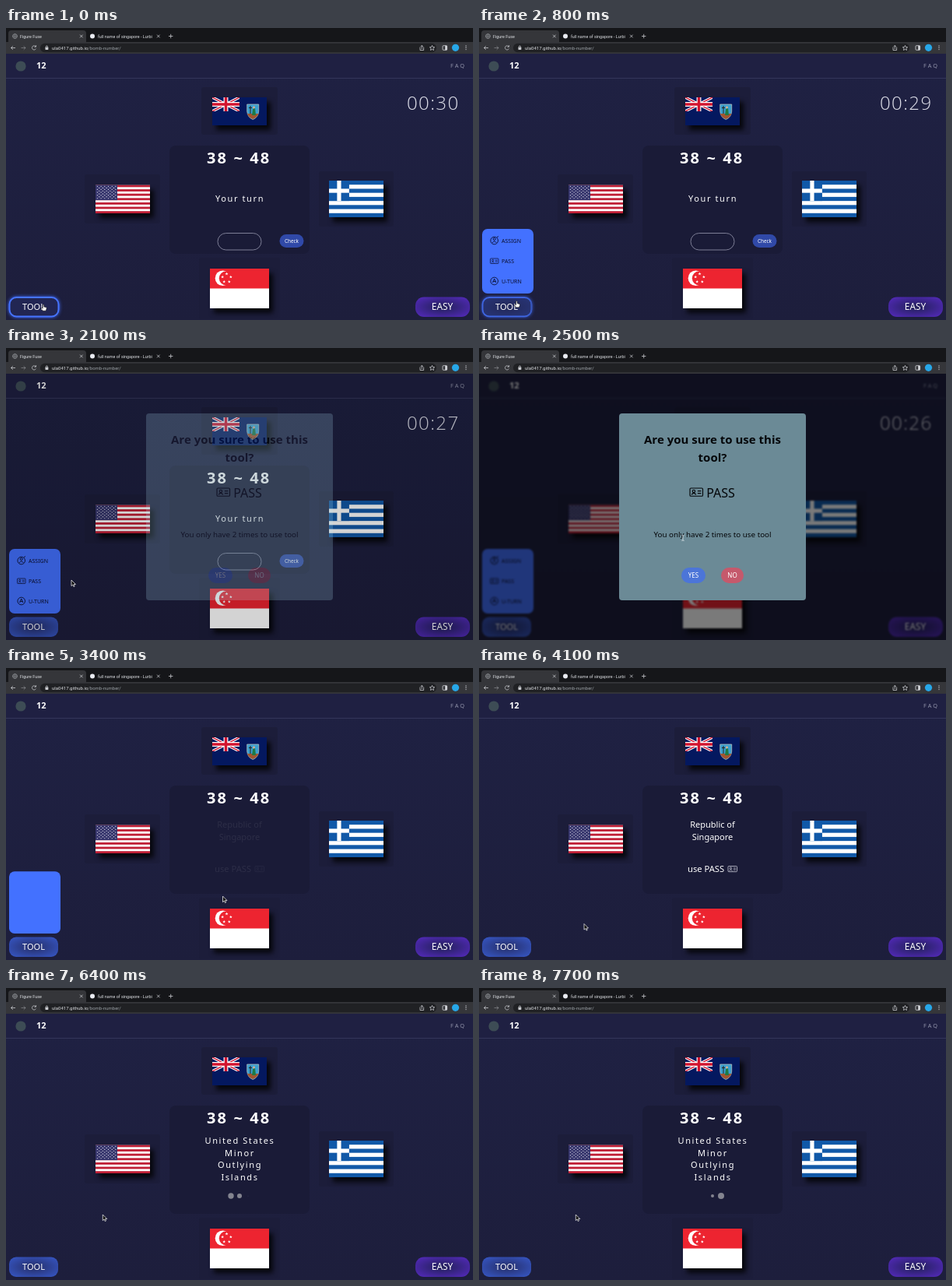
Recreate the animation shown at these times as an HTML page. Size 600x375 px, loop 7.8 s.

```html
<!DOCTYPE html>
<html lang="en">
<head>
<meta charset="utf-8">
<title>Figure Fuse</title>
<style>
  html, body { margin: 0; width: 100%; height: 100%; overflow: hidden; background: #1e1f3f; }
  svg { display: block; width: 600px; height: 375px; }
  text { font-family: "Noto Sans", "Open Sans", sans-serif; fill: #fff; white-space: pre; }
  .ui text { font-family: Roboto, Inter, sans-serif; fill: #dfe1e5; }
  .mid { text-anchor: middle; }
  .flag { filter: drop-shadow(5px 6px 3px #000c); }
  .line { fill: none; stroke: #c8cacf; stroke-width: .8; }
</style>
</head>
<body>
<svg id="stage" viewBox="0 0 600 375"></svg>
<script>
const LOOP = 7800, STEP = 100;

const text = (x, y, size, str, more = '') => `<text x="${x}" y="${y}" font-size="${size}" ${more}>${str}</text>`;
const mid = (x, y, size, str, more = '') => text(x, y, size, str, `class="mid" ${more}`);
const rect = (x, y, w, h, fill, r = 0, more = '') =>
  `<rect x="${x}" y="${y}" width="${w}" height="${h}" rx="${r}" fill="${fill}" ${more}/>`;
const disc = (x, y, r, fill, more = '') => `<circle cx="${x}" cy="${y}" r="${r}" fill="${fill}" ${more}/>`;
const path = (d, more = 'class="line"') => `<path d="${d}" ${more}/>`;
const group = (id, body, more = '') => `<g id="${id}" ${more}>${body}</g>`;
const range = (n, fn) => Array.from({ length: n }, (_, i) => fn(i)).join('');
const frame = (x, y, w, h, vw, vh, body) =>
  `<svg x="${x}" y="${y}" width="${w}" height="${h}" viewBox="0 0 ${vw} ${vh}" preserveAspectRatio="none">${body}</svg>`;

function star(cx, cy, r, fill) {
  const pts = Array.from({ length: 10 }, (_, i) => {
    const a = i * Math.PI / 5, q = i % 2 ? r * .4 : r;
    return `${(cx + q * Math.sin(a)).toFixed(2)},${(cy - q * Math.cos(a)).toFixed(2)}`;
  });
  return `<polygon points="${pts.join(' ')}" fill="${fill}"/>`;
}

const stripes = (n, w, h, color) => range(n, i => i % 2 ? '' : rect(0, i * h / n, w, h / n, color));

function usFlag() {
  const stars = range(9, r => range(r % 2 ? 5 : 6, c => star(2.4 + c * 4.7 + (r % 2) * 2.35, 2 + r * 1.9, .95, '#fff')));
  return frame(115, 201.5, 70, 36.5, 70, 36.5,
    rect(0, 0, 70, 36.5, '#fff') + stripes(13, 70, 36.5, '#c01f36') + rect(0, 0, 28, 19.6, '#35346c') + stars);
}

function unionJack() {
  const cross = 'M0 0L60 30M60 0L0 30', plus = 'M30 0V30M0 15H60';
  const stroke = (d, color, w) => path(d, `stroke="${color}" stroke-width="${w}" fill="none"`);
  return frame(265, 89, 35, 18, 60, 30, rect(0, 0, 60, 30, '#04185f') + stroke(cross, '#fff', 6) +
    stroke(cross, '#d2142f', 2.4) + stroke(plus, '#fff', 10) + stroke(plus, '#d2142f', 6));
}

function islandFlag() {
  const shield = 'M309.7 98H324.7V107Q324 115 317.2 117.5Q310.4 115 309.7 107Z';
  return rect(265, 89, 70, 36, '#04185f') + unionJack() +
    path(shield, 'fill="#3b9fd0" stroke="#c9c7b8" stroke-width=".7"') +
    path('M310 110H324.3Q323 115 317.2 117Q311.5 115 310 110Z', 'fill="#a2552f"') +
    path('M314 100V110M312 102.5H316', 'stroke="#20231f" stroke-width="1" fill="none"') +
    path('M317 104L320 103L321 112H316Z', 'fill="#1f7a45"') + disc(318.5, 102, 1.4, '#e0b28c');
}

function greekFlag() {
  return frame(415, 196, 70, 47, 27, 18, rect(0, 0, 27, 18, '#fff') + stripes(9, 27, 18, '#1159a8') +
    rect(0, 0, 10, 10, '#1159a8') + rect(4, 0, 2, 10, '#fff') + rect(0, 4, 10, 2, '#fff'));
}

function lionFlag() {
  const ring = range(5, i => {
    const a = i * Math.PI * .4;
    return star(283.5 + 5.6 * Math.sin(a), 321.3 - 5.6 * Math.cos(a), 2.1, '#fff');
  });
  return rect(262, 309, 76, 51, '#fff') + rect(262, 309, 76, 25.5, '#ed2430') +
    disc(278.5, 321.3, 9.8, '#fff') + disc(282.8, 321.3, 9, '#ed2430') + ring;
}

function card(x, y, w, color) {
  const h = w * .62;
  return `<g fill="none" stroke="${color}" stroke-width="${w * .07}">` +
    rect(x, y, w, h, 'none', w * .08) + disc(x + w * .3, y + h * .38, w * .1, 'none') +
    path(`M${x + w * .13} ${y + h * .82}q${w * .17} ${-h * .4} ${w * .34} 0M${x + w * .6} ${y + h * .35}h${w * .27}M${x + w * .6} ${y + h * .65}h${w * .27}`, '') + '</g>';
}

const defs = `<defs>
  <radialGradient id="blue" r=".62"><stop offset=".1" stop-color="#27316f"/><stop offset="1" stop-color="#3553bd"/></radialGradient>
  <radialGradient id="violet" r=".62"><stop offset=".1" stop-color="#25215f"/><stop offset="1" stop-color="#5029b4"/></radialGradient>
  <linearGradient id="sky" x2="0" y2="1"><stop offset="0" stop-color="#1f2143"/><stop offset="1" stop-color="#1d1e3c"/></linearGradient>
</defs>`;

const browser = group('browser',
  rect(0, 0, 600, 19, '#151619') + rect(3, 3, 100, 20, '#35363a', 4) + rect(0, 18, 600, 15, '#35363a') +
  disc(11.5, 10.5, 2.8, 'none', 'stroke="#a5a8ad" stroke-width=".8"') + path('M8.7 10.5H14.3M11.5 7.7V13.3', 'stroke="#a5a8ad" stroke-width=".5"') +
  text(18, 12.5, 5.4, 'Figure Fuse') + path('M95 8.7l3.6 3.6m0-3.6l-3.6 3.6') +
  disc(111, 10.5, 3, '#e8eaf0') + text(118, 12.5, 5.4, 'full name of singapore - Lurbi') +
  path('M194 8.7l3.6 3.6m0-3.6l-3.6 3.6M209 10.5h5.4M211.7 7.8v5.4') +
  path('M12 25.5H6.5m2.3-2.3l-2.3 2.3l2.3 2.3') + path('M19.5 25.5H25m-2.3-2.3l2.3 2.3l-2.3 2.3', 'class="line" opacity=".5"') +
  path('M38.3 24a2.6 2.6 0 1 0 .1 2.6M38.5 22.2v2h-2') +
  rect(44, 19.8, 509, 11.4, '#202124', 5.7) +
  rect(50.5, 24.8, 3.8, 3.2, '#c8cacf', .5) + path('M51.3 25v-1a1.1 1.1 0 0 1 2.2 0v1') +
  text(59, 27.6, 6, 'ula0417.github.io<tspan fill="#9aa0a6">/bomb-number/</tspan>') +
  path('M532 24.5v4h4.6v-4M534.3 27v-4.6m-1.5 1.5l1.5-1.5l1.5 1.5') +
  path('M547.5 22.4l1 2.1 2.2.2-1.7 1.5.5 2.3-2-1.2-2 1.2.5-2.3-1.7-1.5 2.2-.2z') +
  rect(561, 22.7, 5.6, 5.6, 'none', 1, 'stroke="#d6d8dc" stroke-width=".8"') + rect(564.2, 22.7, 2.4, 5.6, '#d6d8dc') +
  disc(577.5, 25.3, 4.6, '#27a7e8') +
  range(3, i => disc(591, 23 + i * 2.3, .7, '#c8cacf')), 'class="ui"');

const panels = [[251, 76, 98, 61], [101, 188, 97, 63], [402, 184, 96, 71], [248, 295, 104, 79]]
  .map(b => rect(...b, '#1c1d3a', 3)).join('');

const bigLines = ['United States', 'Minor', 'Outlying', 'Islands'];
const center = rect(210, 151, 180, 139, '#1a1b37', 8) +
  text(258, 174, 20, '38 ~ 48', 'font-weight="700" letter-spacing="2.1"') +
  group('ask', text(269, 223, 11, 'Your turn', 'letter-spacing="1.6"') +
    rect(272, 263.5, 56, 21.5, 'none', 10.7, 'stroke="#7d7e96"') +
    rect(351.5, 265, 31, 17, '#3049a8', 8.5) + mid(367, 275.8, 6.4, 'Check')) +
  group('reply', mid(300, 205, 11, 'Republic of') + mid(300, 221, 11, 'Singapore') +
    text(268, 262, 11.2, 'use PASS') + card(320, 254.5, 11.5, '#c9cad6')) +
  group('next', bigLines.map((s, i) => mid(300.5, 200 + i * 15.5, 11, s, 'letter-spacing="1.6"')).join('') +
    range(3, i => disc(289 + i * 11, 267, 4, '#83848f', 'class="dot"')));

const ink = '#0c1030';
const ring = (y, d) => disc(19.7, y, 4.8, 'none', `stroke="${ink}" stroke-width=".9"`) + path(d, `fill="none" stroke="${ink}" stroke-width=".9"`);
const menu = group('menu', rect(4, 258, 66, 83, '#4371ff', 7) + group('items',
  ring(273, 'M17 276q2.7-4 5.4 0M18.2 271a1.5 1.5 0 1 0 3 0a1.5 1.5 0 1 0-3 0M23 269l2-1.6') + text(29, 275.6, 7, 'ASSIGN', `style="fill:${ink}"`) +
  group('plain', card(14.5, 296, 10.5, ink) + text(29, 301.6, 7, 'PASS', `style="fill:${ink}"`)) +
  group('lit', card(14.5, 296, 10.5, '#253a9a') + text(29, 301.6, 7, 'PASS', 'font-style="italic" font-weight="300" letter-spacing=".3"') +
    text(53, 302.3, 9, '×2', 'font-weight="700"')) +
  ring(325, 'M17.5 327l2.2-5l2.2 5M18.3 325.5h3') + text(29, 327.6, 7, 'U-TURN', `style="fill:${ink}"`)));

const useTips = group('tips',
  rect(72, 292, 24, 15, '#2c4199', 7.5, 'style="filter:drop-shadow(0 0 2px #3f64e8)"') + mid(84, 301.9, 6.8, 'use') +
  disc(109, 299.5, 6.3, '#2f4aaa') + mid(109, 302.2, 7, '?'));

const page = group('page',
  rect(0, 33, 600, 342, 'url(#sky)') + rect(0, 33, 600, 31, '#1f2042') + rect(0, 64, 600, 1, '#34365a') +
  disc(19, 49, 6.6, '#3d4c55') + text(39, 52, 11, '12', 'font-weight="700"') +
  text(571, 50.6, 7.4, 'FAQ', 'letter-spacing="2" style="fill:#8f91a8"') +
  text(515, 105, 24, '', 'id="clock" font-weight="300" letter-spacing="1.4" style="font-family:\'Open Sans\',sans-serif;fill:#dcdde8"') +
  panels + `<g class="flag">${islandFlag()}</g><g class="flag">${greekFlag()}</g><g class="flag">${lionFlag()}</g>` +
  group('us', usFlag()) +
  group('info', mid(150, 211.8, 4.5, 'United States Minor', 'style="fill:#15101c" font-weight="600"') +
    mid(150, 217.8, 4.5, 'Outlying islands', 'style="fill:#15101c" font-weight="600"') +
    rect(133.5, 232, 33, 13, 'none', 2, 'stroke="#70405a" stroke-width=".6" opacity=".6"') +
    mid(150.5, 241.5, 8.5, 'INFO', 'style="fill:#5a3146" letter-spacing="1"')) +
  center + menu + useTips +
  group('tool', rect(4, 345.5, 63, 25.5, 'url(#blue)', 9)) +
  group('toolLit', rect(4.5, 346, 63, 24.5, '#222653', 9, 'stroke="#4674ff" stroke-width="2" style="filter:drop-shadow(0 0 2px #3f6cff)"')) +
  mid(35.5, 362, 11, 'TOOL') +
  rect(526, 345.5, 70, 25.5, 'url(#violet)', 11) + mid(560.5, 362, 11.8, 'EASY'));

const modal = group('modal', rect(0, 33, 600, 342, '#000', 0, 'opacity=".52"') +
  rect(180, 84, 240, 240, '#6b8a96', 4) +
  `<g style="--k:#05070a">` +
  [[300, 122.5, 15, 'Are you sure to use this', 'font-weight="700"'], [300, 145.5, 15, 'tool?', 'font-weight="700"'],
   [310.5, 191.5, 16, 'PASS', ''], [300, 243, 9.8, 'You only have 2 times to use tool', '']]
    .map(([x, y, s, str, more]) => mid(x, y, s, str, more + ' style="fill:var(--k)"')).join('') + '</g>' +
  card(271, 180, 16.5, '#05070a') +
  rect(260, 282, 31, 20, '#4c75d8', 10) + mid(275.5, 294.8, 8, 'YES') +
  rect(311, 282, 29, 20, '#c5596c', 10) + mid(325.5, 294.8, 8, 'NO'));

const cursor = group('cursor',
  group('arrow', path('M0 0V7.6L1.8 6L3 8.6L4.2 8L3.1 5.5H5.5Z', 'fill="#111" stroke="#fff" stroke-width=".7"')) +
  group('hand', path('M-.8 .4Q0-.6 .8 .4V3L3.8 3.8Q4.6 4.4 4 6L3.2 8.2H-.8L-3 5Q-2.6 4-1.6 4.6L-.8 5.2Z', 'fill="#fff" stroke="#111" stroke-width=".6"')) +
  group('beam', path('M-1.6-3.5Q0-3.5 0-2.5V2.5Q0 3.5-1.6 3.5M1.6-3.5Q0-3.5 0-2.5M0 2.5Q0 3.5 1.6 3.5', 'fill="none" stroke="#dfe6ea" stroke-width=".8"')));

document.getElementById('stage').innerHTML = defs + page + modal + browser + cursor;

const $ = id => document.getElementById(id);
const dots = [...document.querySelectorAll('.dot')];
const ramp = (t, a, b) => Math.min(1, Math.max(0, (t - a) / (b - a)));
const ease = p => p * p * (3 - 2 * p);
const show = (id, v) => { $(id).style.opacity = +v; };

// time, x, y, pointer shape from that time on
const moves = [
  [0, 48, 355, 'hand'], [700, 48, 355, 'hand'], [1300, 52, 296, 'hand'], [1500, 52, 296, 'hand'],
  [1800, 84, 298, 'hand'], [2100, 84, 298, 'arrow'], [2400, 262, 244, 'beam'], [2600, 262, 244, 'arrow'],
  [2800, 275, 290, 'hand'], [3100, 275, 290, 'arrow'], [3400, 278.5, 293, 'arrow'], [3900, 135, 328.5, 'arrow'],
  [4500, 135, 328.5, 'arrow'], [5000, 123, 226, 'arrow'], [5900, 123, 226, 'arrow'], [6300, 124.3, 291, 'arrow']
];

function moveCursor(t) {
  const i = moves.findLastIndex(m => m[0] <= t);
  const a = moves[i], b = moves[i + 1] || a;
  const p = a === b ? 0 : ease(ramp(t, a[0], b[0]));
  $('cursor').setAttribute('transform', `translate(${a[1] + (b[1] - a[1]) * p} ${a[2] + (b[2] - a[2]) * p})`);
  for (const id of ['arrow', 'hand', 'beam']) show(id, id === a[3]);
}

function draw(t) {
  $('clock').textContent = t < 3100 ? '00:' + (30 - Math.floor((t + 100) / 620)) : '';

  const open = ease(ramp(t, 200, 600)), shut = ramp(t, 3300, 3800);
  const size = open * (1 - shut * shut);
  $('menu').setAttribute('transform', `translate(0 ${341 * (1 - size)}) scale(1 ${size})`);
  show('items', ramp(t, 300, 600) * (1 - ramp(t, 3200, 3400)));
  const pick = t >= 1200 && t < 2100;
  show('lit', pick);
  show('plain', !pick);
  show('tips', pick);
  show('toolLit', 1 - ramp(t, 700, 1000));

  const ask = ramp(t, 2000, 2300) * (1 - ramp(t, 3000, 3300));
  show('modal', ask);
  $('page').style.filter = ask ? `blur(${1.1 * ask}px)` : 'none';

  show('ask', t < 3100);
  show('reply', ease(ramp(t, 3300, 3900)) * (1 - ramp(t, 4400, 4600)));
  show('next', ramp(t, 4600, 4800));
  dots.forEach((dot, i) => {
    const wave = Math.cos(2 * Math.PI * (t - 5400) / 920 - i * Math.PI / 2);
    dot.setAttribute('r', 2 + 2 * wave);
  });

  const hover = ramp(t, 4900, 5400) * (1 - ramp(t, 6000, 6300));
  const fade = 1 - hover;
  $('us').style.filter = `blur(${2.4 * hover}px) drop-shadow(${5 * fade}px ${6 * fade}px 3px rgba(0,0,0,${.8 * fade}))`;
  show('us', 1 - .2 * hover);
  show('info', hover);
  moveCursor(t);
}

const start = performance.now();
function tick() {
  const t = (performance.now() - start) % LOOP;
  draw(Math.floor(t / STEP) * STEP);
  requestAnimationFrame(tick);
}
tick();
</script>
</body>
</html>
```
